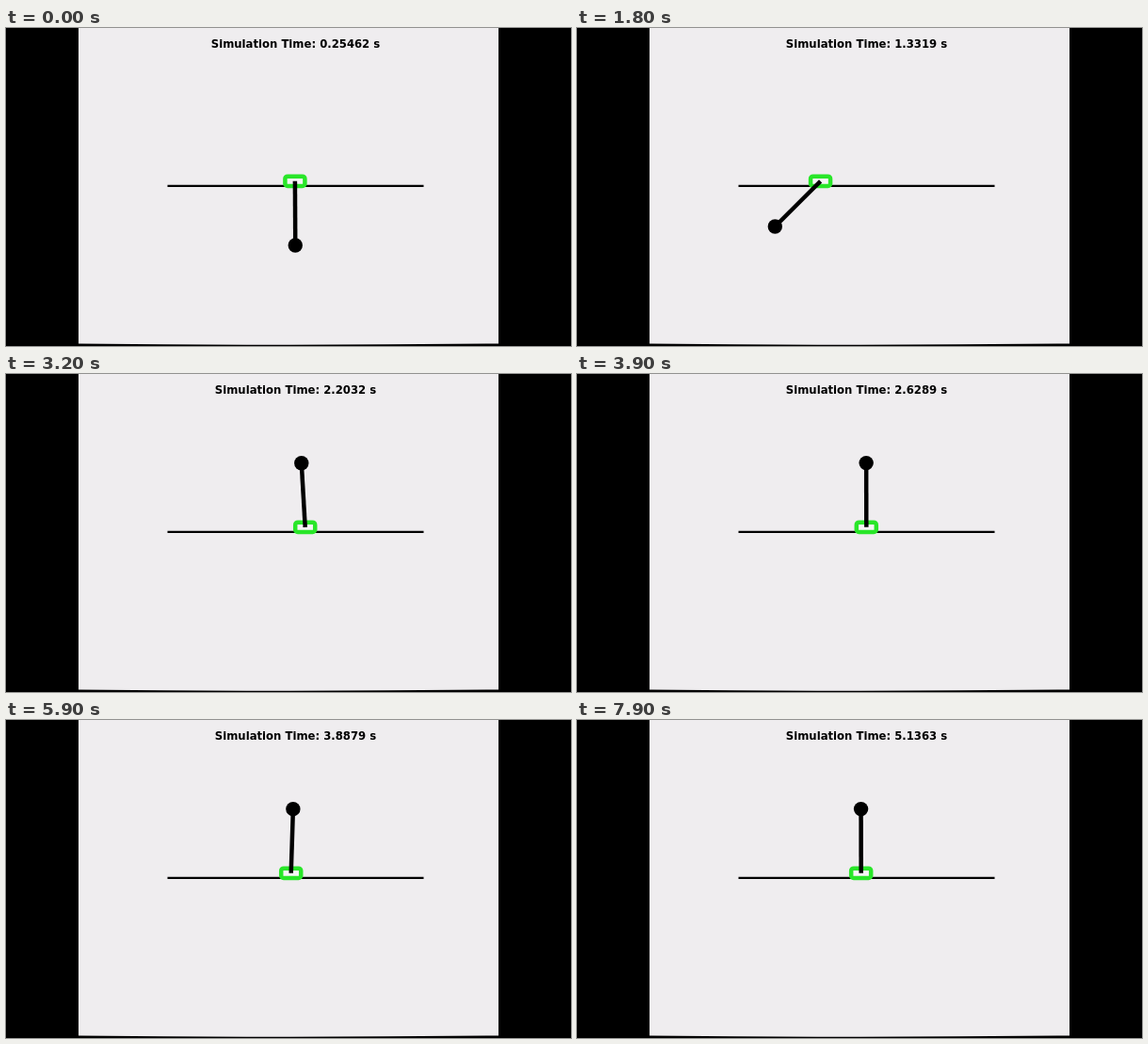
Write an HTML page that moves like this. It is 600 px wide and 338 px high and loops after 8000 ms.

```html
<!DOCTYPE html>
<html>
<head>
<meta charset="utf-8">
<style>
html, body { margin: 0; width: 100%; height: 100%; overflow: hidden; background: #000; }
svg { display: block; width: 100vw; height: 100vh; }
text { font: bold 11.67px "DejaVu Sans", sans-serif; text-anchor: middle; }
</style>
</head>
<body>
<svg viewBox="0 0 600 338">
  <rect width="600" height="338"/>
  <path d="M77 0H523V335.4Q300 338 77 335.4Z" fill="#efedef"/>
  <text id="label" x="307.5" y="21.3"></text>
  <path d="M171.5 167.9H443.5" stroke="#000" stroke-width="2.3"/>
  <rect id="cart" y="157.7" width="21" height="10.3" rx="2.6" fill="#f8f5f8" stroke="#29e629" stroke-width="4.5"/>
  <path id="pole" stroke="#000" stroke-width="4.5"/>
  <circle id="bob" r="7.7"/>
</svg>
<script>
const [label, cart, pole, bob] = ['label', 'cart', 'pole', 'bob'].map(id => document.getElementById(id));
const LOOP = 8, FPS = 10, PIVOT_Y = 162.8, LENGTH = 68.2;

// Simulated seconds shown at a few moments; the clock runs evenly between them.
const clock = [[0, .25462], [1, .82536], [2.6, 1.8384], [3.9, 2.6289], [5.1, 3.3826], [6.5, 4.2668], [7.9, 5.1363]];

// Turning points [seconds, value]; the angle is in degrees from hanging, positive to the right.
const cartTurns = [[0, 306.9], [1.32, 230], [2.6, 322.6], [4.3, 305], [5.1, 307.9], [6.8, 296.5], [8.1, 302]];
// A third value below 1 makes the following swing start fast and settle slowly.
const poleTurns = [[0, .3], [1, 40.5, .758], [3.45, -180], [5.1, -179.3], [6.4, -183], [8.1, -179.8]];

const even = u => u;
const swing = u => (1 - Math.cos(Math.PI * u)) / 2;

function track(keys, t, ease) {
  const i = Math.max(1, keys.findIndex(k => k[0] > t) % keys.length);
  const next = keys.findIndex(k => k[0] > t) < 0 ? keys.length - 1 : i;
  const [t0, v0, power = 1] = keys[next - 1], [t1, v1] = keys[next];
  return v0 + (v1 - v0) * ease(((t - t0) / (t1 - t0)) ** power);
}

function draw(seconds) {
  const t = Math.floor(seconds % LOOP * FPS) / FPS;
  const x = track(cartTurns, t, swing), angle = track(poleTurns, t, swing) * Math.PI / 180;
  const bx = x + LENGTH * Math.sin(angle), by = PIVOT_Y + LENGTH * Math.cos(angle);
  label.textContent = `Simulation Time: ${+track(clock, t, even).toPrecision(5)} s`;
  cart.setAttribute('x', x - 10.5);
  pole.setAttribute('d', `M${x} ${PIVOT_Y}L${bx} ${by}`);
  bob.setAttribute('cx', bx);
  bob.setAttribute('cy', by);
}

const start = performance.now();
function tick() {
  draw((performance.now() - start) / 1000);
  requestAnimationFrame(tick);
}
tick();
</script>
</body>
</html>
```
